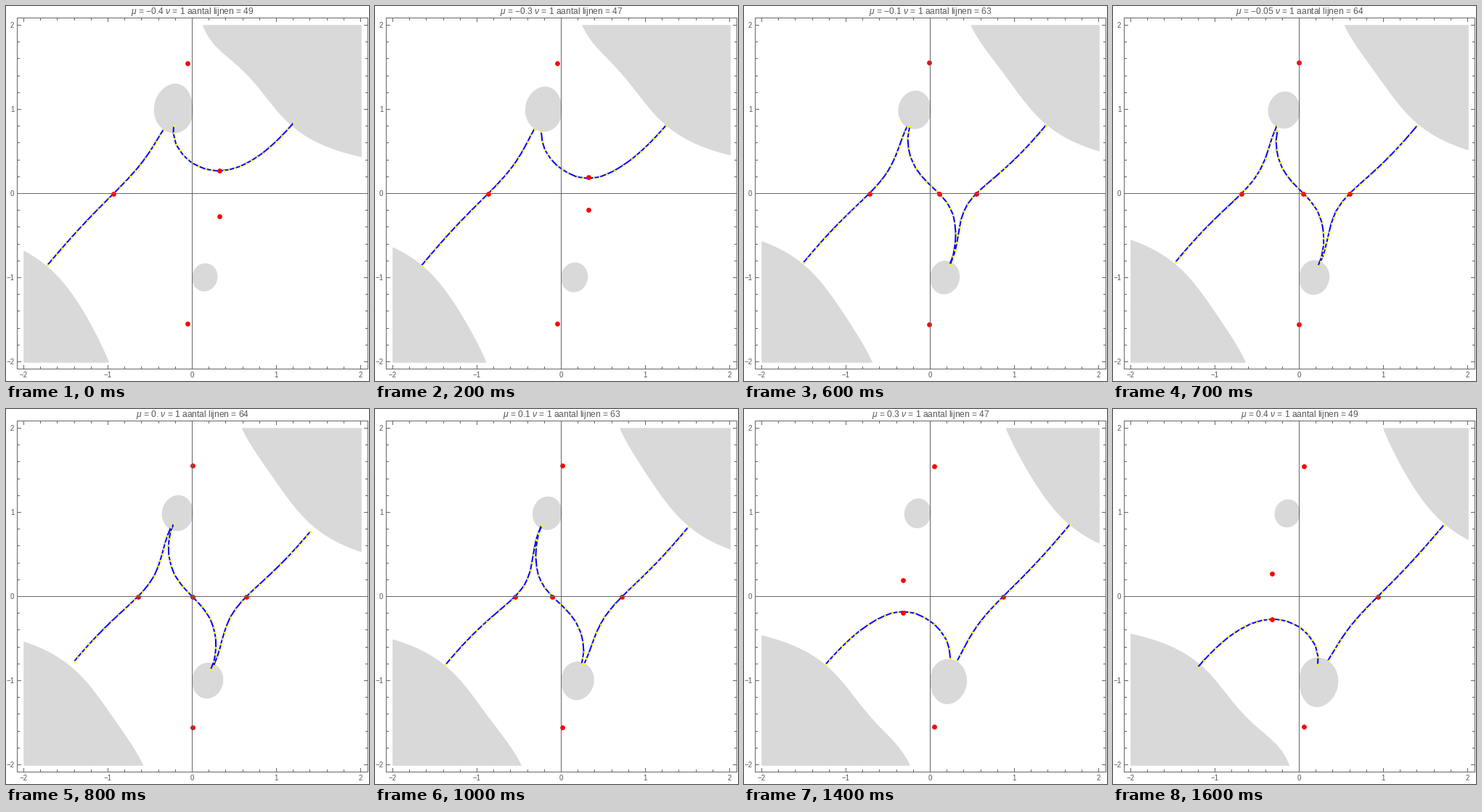
A matplotlib script for the animation above (1700 ms loop, 500 px wide and 517 px high).

```python
import numpy as np
import matplotlib.pyplot as plt
from matplotlib.animation import FuncAnimation
from matplotlib.collections import LineCollection

plt.rcParams.update({
    "font.family": "Liberation Sans",
    "mathtext.fontset": "custom",
    "mathtext.it": "Liberation Sans:italic",
    "mathtext.rm": "Liberation Sans",
})

WIDTH, HEIGHT, DPI = 500, 517, 64
PT = 72 / DPI                       # points per pixel
CX, CY, UNIT = 256.5, 258.5, 116    # pixel place of 0 and length of 1
LEFT, RIGHT, TOP, BOTTOM = 15.5, 498.5, 16.5, 500.5
INK, TEXT, SHADE = "#666666", "#575757", "#d9d9d9"

FRAMES, MID = 17, 8
NU, LIMIT = 1, 1
STEPS, DT, MAX_LEN = 150, 0.02, 0.13
# line count by distance from the middle step
LINE_COUNTS = [64, 64, 63, 56, 47, 46, 47, 48, 49]


def sx(x):
    return CX + UNIT * x


def sy(y):
    return CY - UNIT * y


def phase(z, mu):
    return (z - mu) ** 2 / 2 + NU / (1 + z * z)


def slope(z, mu):
    return z - mu - 2 * NU * z / (1 + z * z) ** 2


def saddles(mu):
    return np.roots([1, -mu, 2, -2 * mu, 1 - 2 * NU, -mu])


def flow(mu):
    """Let the real line flow downhill, splitting long pieces on the way."""
    z = np.linspace(-2, 2, 41) + 0j
    joined = np.ones(len(z) - 1, bool)
    for _ in range(STEPS):
        live = phase(z, mu).imag < LIMIT
        z = np.where(live, z + DT * 1j * np.conj(slope(z, mu)), z)
        joined &= live[:-1] & live[1:]
        gaps = np.flatnonzero(joined & (np.abs(np.diff(z)) > MAX_LEN))
        z = np.insert(z, gaps + 1, (z[gaps] + z[gaps + 1]) / 2)
        joined = np.insert(joined, gaps, True)
    return z[:-1][joined], z[1:][joined]


def to_xy(z):
    return np.column_stack([sx(z.real), sy(z.imag)])


fig = plt.figure(figsize=(WIDTH / DPI, HEIGHT / DPI), dpi=DPI, facecolor="white")
ax = fig.add_axes([0, 0, 1, 1])
ax.set_xlim(0, WIDTH)
ax.set_ylim(HEIGHT, 0)
ax.axis("off")


def rule(x0, y0, x1, y1):
    """Crisp one-pixel line through pixel centres."""
    x, y = np.floor([x0, x1]) + 0.5, np.floor([y0, y1]) + 0.5
    ax.plot(x, y, color=INK, lw=PT, zorder=6, snap=False,
            solid_capstyle="projecting")


def label(x, y, text, size, align):
    return ax.text(x, y, text, size=size * PT, color=TEXT, ha=align,
                   va="baseline", zorder=6)


def draw_axes():
    for x in (LEFT, CX, RIGHT):
        rule(x, TOP, x, BOTTOM)
    for y in (TOP, CY, BOTTOM):
        rule(LEFT, y, RIGHT, y)
    for k in range(-10, 11):
        size = 5 if k % 5 == 0 else 3
        x, y = sx(k / 5), sy(k / 5)
        rule(x, TOP, x, TOP + size)
        rule(x, BOTTOM, x, BOTTOM - size)
        rule(LEFT, y, LEFT + size, y)
        rule(RIGHT, y, RIGHT - size, y)
    for k in range(-2, 3):
        text = str(k).replace("-", "\u2212")
        label(sx(k) - 0.5, 512.5, text, 9.8, "center")
        label(11.3, sy(k) + 3, text, 9.8, "right")


def title_text(step, mu):
    sign = "\u2212" if mu < 0 else ""
    number = f"{abs(mu):g}" if mu else "0."
    count = LINE_COUNTS[abs(step - MID)]
    return (f"$\\mathit{{\\mu}}$ = {sign}{number} $\\mathit{{\\nu}}$ = {NU} "
            f"aantal lijnen = {count}")


draw_axes()
title = label(257, 11, "", 12, "center")
grid = np.linspace(-2, 2, 400)
plane = grid + 1j * grid[:, None]
moving = []


def dots(z, size, color, zorder):
    return ax.scatter(*to_xy(z).T, s=(size * PT) ** 2, color=color,
                      linewidths=0, zorder=zorder, snap=False)


def update(step):
    while moving:
        moving.pop().remove()
    mu = (step - MID) / 20
    depth = np.clip(phase(plane, mu).imag, -50, 50)
    region = ax.contourf(sx(grid), sy(grid), depth, levels=[LIMIT, 100],
                         colors=[SHADE], antialiased=True, zorder=1)
    region.set(edgecolor=SHADE, linewidth=1.6 * PT)
    start, end = flow(mu)
    lines = LineCollection(np.stack([to_xy(start), to_xy(end)], axis=1),
                           colors="blue", linewidths=2 * PT, zorder=2)
    ax.add_collection(lines, autolim=False)
    joints = np.unique(np.concatenate([start, end]))
    moving.extend([region, lines, dots(joints, 3, "yellow", 3),
                   dots(saddles(mu), 6.8, "red", 4)])
    title.set_text(title_text(step, mu))
    return moving


anim = FuncAnimation(fig, update, frames=FRAMES, interval=100, repeat=True,
                     repeat_delay=0, init_func=lambda: [], blit=False)
plt.show()
```
